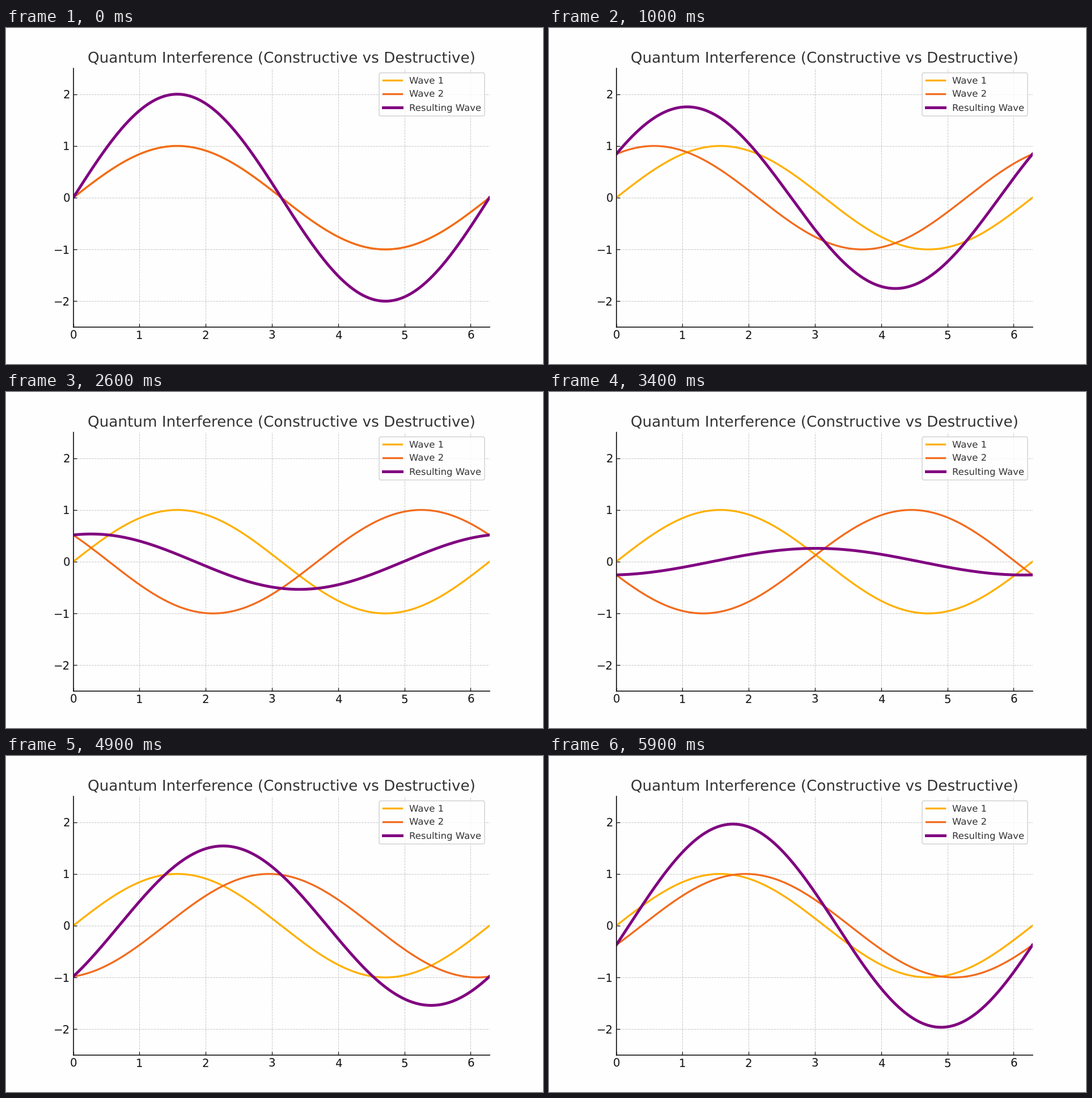
A matplotlib script that plays this animation: 947x592 px, repeating every 6000 ms.

```python
import numpy as np
import matplotlib.pyplot as plt
from matplotlib.animation import FuncAnimation

FRAMES, INTERVAL = 60, 100
PHASE_STEP = 0.1
INK, TEXT = "#111111", "#333333"

# Unhinted glyphs keep text heights proportional to the font size.
plt.rcParams.update({"font.family": "DejaVu Sans",
                     "text.hinting": "no_hinting"})

fig, ax = plt.subplots(figsize=(8, 5), dpi=118.4, facecolor="#fefefe")
fig.subplots_adjust(left=0.12516, right=0.90008)
ax.set_facecolor("#fefefe")
ax.set_xlim(0, 2 * np.pi)
ax.set_ylim(-2.5, 2.5)
ax.set_title("Quantum Interference (Constructive vs Destructive)",
             fontsize=16, color=TEXT)
ax.grid(True, linestyle="--", linewidth=0.6, color="#b0b0b0", alpha=0.7)
ax.tick_params(direction="in", labelsize=12, color=INK, labelcolor=INK)
ax.spines[["top", "right"]].set_visible(False)
for side in ("left", "bottom"):
    ax.spines[side].set(color=INK, linewidth=1)

x = np.linspace(0, 2 * np.pi, 500)
wave1 = np.sin(x)
ax.plot(x, wave1, color="#ffb000", lw=2, label="Wave 1")
line2, = ax.plot(x, wave1, color="#f26b1d", lw=2, label="Wave 2")
total, = ax.plot(x, 2 * wave1, color="purple", lw=3, label="Resulting Wave")
ax.legend(loc="upper right", fontsize=10, labelcolor=TEXT)


def update(i):
    wave2 = np.sin(x + PHASE_STEP * i)
    line2.set_ydata(wave2)
    total.set_ydata(wave1 + wave2)
    return line2, total


anim = FuncAnimation(fig, update, frames=FRAMES, interval=INTERVAL,
                     repeat=True, repeat_delay=0)
plt.show()
```
